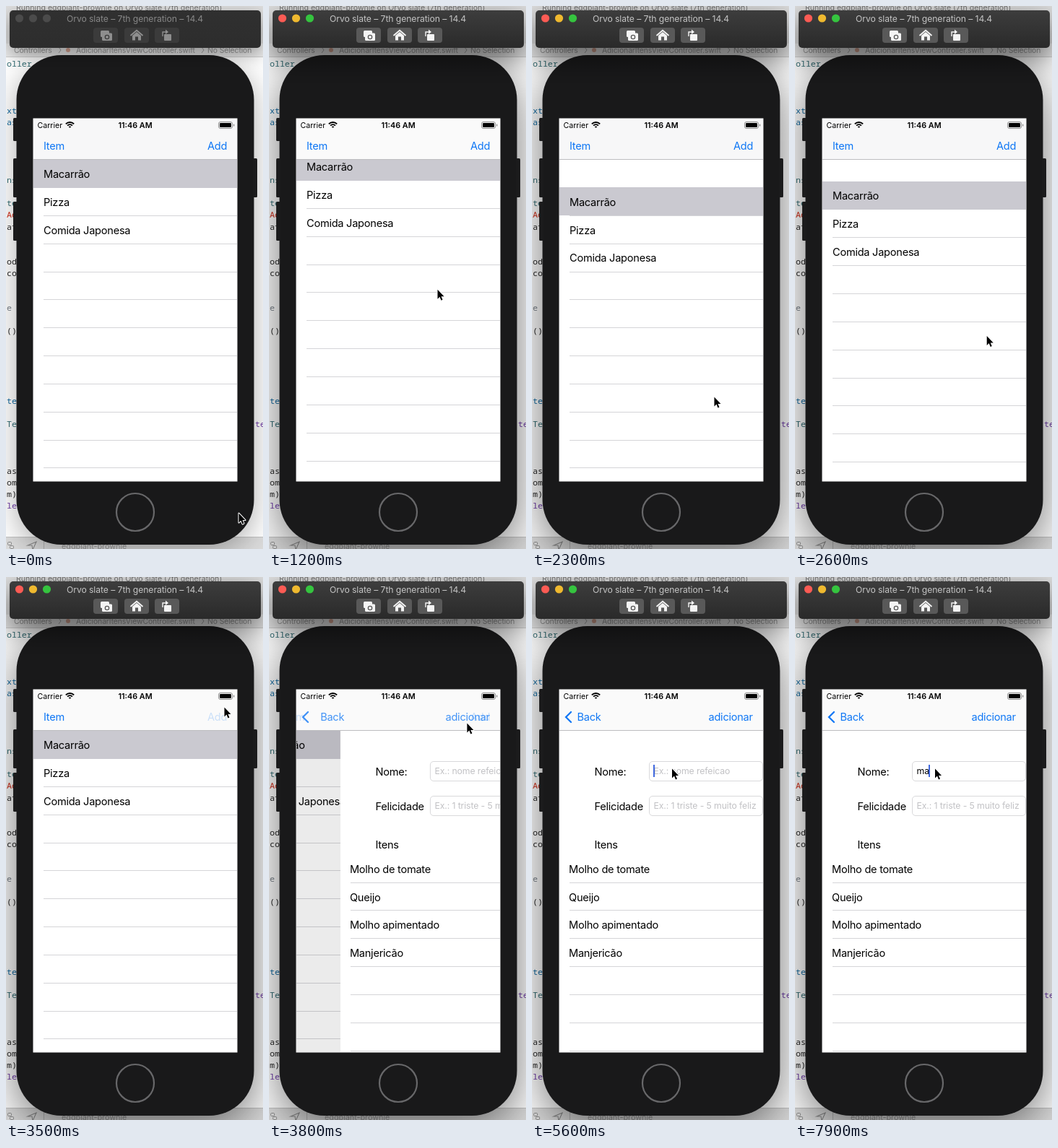
Write an HTML page with a canvas that moves like this. It is 356 px wide and 752 px high and loops after 8000 ms.

```html
<!DOCTYPE html>
<html lang="pt">
<head>
<meta charset="utf-8">
<title>Simulator</title>
<style>
html, body { margin: 0; width: 100%; height: 100%; overflow: hidden; background: #fff; }
canvas { display: block; width: 356px; height: 752px; }
</style>
</head>
<body>
<canvas id="stage" width="356" height="752"></canvas>
<script>
const ctx = document.getElementById('stage').getContext('2d');
const LOOP = 8000, STEP = 100;
const UI = 'Inter, sans-serif', MONO = '"Noto Sans Mono", monospace';
const SCREEN = { x: 38, y: 156, w: 282, h: 502 };
const NAV_BOTTOM = 213, ROW = 38.85;
const BLUE = '#0f77f5', LINE = '#d5d5d8';

// When things happen, in ms
const FOCUS = 900, PRESS = 3300, PUSH = 3600, TAP = 4600, TYPE_M = 6400, TYPE_A = 7900;

const POINTER_START = { x: 322, y: 702 };
const POINTER_MOVES = [
  { from: 0, to: 750, x: 233, y: 412 },
  { from: 1000, to: 1650, x: 233, y: 325 },
  { from: 1800, to: 2300, x: 252, y: 541 },
  { from: 2400, to: 3000, x: 303, y: 215 },
  { from: 3100, to: 3400, x: 302, y: 180 },
  { from: PUSH, to: 4200, x: 193.5, y: 265 }
];

// One text fragment per editor line, with a colour key in front
const CODE = 't:oller||||b:xt|b:as|||||t:ns||t:te|r:Ad|k:at|||k:od|k:co|||g:e||k:()||||||b:te||t:Te||||k:as|k:om|k:m)|p:le';
const SYNTAX = { t: '#326d74', b: '#0f68a0', r: '#d12f1b', k: '#262626', g: '#777f88', p: '#703daa' };

const clamp = v => Math.min(1, Math.max(0, v));
const progress = (t, from, to) => clamp((t - from) / (to - from));
const smooth = (t, from, to) => {
  const u = progress(t, from, to);
  return u * u * (3 - 2 * u);
};

const pointerAt = t => POINTER_MOVES.reduce((p, m) => {
  const u = smooth(t, m.from, m.to);
  return { x: p.x + (m.x - p.x) * u, y: p.y + (m.y - p.y) * u };
}, POINTER_START);

// Drag up, pull down one row past the top, spring back
const scrollAt = t =>
  -44 * smooth(t, 1000, 1650) + (44 + ROW) * smooth(t, 1800, 2250) - ROW * smooth(t, 2450, 2950);

const pushAt = t => 1 - (1 - progress(t, PUSH, PUSH + 500)) ** 3;

function caretAt(t) {
  if (t < TAP) return 0;
  const since = t - (t >= TYPE_A ? TYPE_A : t >= TYPE_M ? TYPE_M : TAP);
  return clamp(0.9 + 2 * Math.cos((since - 200) / 1000 * Math.PI * 2));
}

function rect(x, y, w, h, color) {
  ctx.fillStyle = color;
  ctx.fillRect(x, y, w, h);
}

function round(x, y, w, h, r, color) {
  ctx.beginPath();
  ctx.roundRect(x, y, w, h, r);
  ctx.fillStyle = color;
  ctx.fill();
}

function outline(x, y, w, h, r, color) {
  ctx.beginPath();
  ctx.roundRect(x, y, w, h, r);
  ctx.strokeStyle = color;
  ctx.lineWidth = 1;
  ctx.stroke();
}

function disc(x, y, r, color) {
  ctx.beginPath();
  ctx.arc(x, y, r, 0, Math.PI * 2);
  ctx.fillStyle = color;
  ctx.fill();
}

function stroke(path, color, width) {
  ctx.strokeStyle = color;
  ctx.lineWidth = width;
  ctx.stroke(new Path2D(path));
}

function fill(path, color) {
  ctx.fillStyle = color;
  ctx.fill(new Path2D(path));
}

// y is the middle of the capital letters
function text(str, x, y, { size = 14.6, color = '#000', weight = 400, track = -0.018, align = 'left', font = UI } = {}) {
  ctx.font = `${weight} ${size}px ${font}`;
  ctx.letterSpacing = `${track * size}px`;
  ctx.textAlign = align;
  ctx.fillStyle = color;
  ctx.fillText(str, x, y + size * 0.36);
}

function scoped(draw, { alpha = 1, dx = 0, shadow } = {}) {
  ctx.save();
  ctx.globalAlpha *= alpha;
  ctx.translate(dx, 0);
  if (shadow) {
    ctx.shadowColor = `rgba(0,0,0,${shadow.alpha})`;
    ctx.shadowBlur = shadow.blur;
    ctx.shadowOffsetY = shadow.y;
  }
  draw();
  ctx.restore();
}

function drawEditor() {
  rect(0, 0, 356, 752, '#fff');
  rect(0, 0, 356, 52, '#dedede');
  rect(0, 52, 356, 18, '#ececec');
  rect(0, 70, 356, 1, '#d2d2d2');
  text('Running eggplant-brownie on Orvo slate (7th generation)', 14, 2.5, { size: 10.6, color: '#777', track: 0 });
  const crumb = { size: 10.4, color: '#989898', track: -0.01 };
  text('Controllers', 11, 61, crumb);
  disc(86, 61, 3, '#d9a593');
  text('AdicionarItensViewController.swift', 97, 61, crumb);
  text('No Selection', 279, 61, crumb);
  [73, 271].forEach(x => stroke(`M${x} 57l3 4l-3 4`, '#a5a5a5', 1));

  const lineY = n => 80 + 16.1 * n;
  const code = { size: 11.6, track: 0, font: MONO };
  CODE.split('|').forEach((entry, n) => {
    const [key, str] = entry.split(':');
    if (str) text(str, 1, lineY(n), { ...code, color: SYNTAX[key] });
  });
  text('te', 345, lineY(31), { ...code, color: SYNTAX.p });

  rect(0, 735, 356, 17, '#dcdcdc');
  rect(0, 735, 356, 1, '#c2c2c2');
  outline(2.5, 742.5, 5, 4, 1, '#8a8a8a');
  outline(5.5, 747.5, 5, 4, 1, '#8a8a8a');
  stroke('M30 747l12-5l-5 11l-1-6z', '#8a8a8a', 1.1);
  rect(52, 741, 1, 11, '#b5b5b5');
  text('eggplant-brownie', 77, 748.5, { size: 10.8, color: '#999', track: 0 });
}

function drawDevice(active) {
  const body = () => round(14.5, 68, 329, 678, 62, '#19191a');
  const shadow = active ? { alpha: 0.55, blur: 62, y: 16 } : { alpha: 0.32, blur: 40, y: 10 };
  scoped(body, { shadow });
  round(10, 155, 6, 32, 1.5, '#1b1b1c');
  [10, 342].forEach(x => round(x, 211, 6, 54, 1.5, '#1b1b1c'));
  round(10, 271, 6, 54, 1.5, '#1b1b1c');
  ctx.beginPath();
  ctx.arc(179, 701, 26, 0, Math.PI * 2);
  ctx.strokeStyle = '#68686a';
  ctx.lineWidth = 2.2;
  ctx.stroke();
}

function drawTitleBar(active) {
  const shade = ctx.createLinearGradient(0, 6, 0, 58);
  shade.addColorStop(0, active ? '#3d3d3d' : '#303030');
  shade.addColorStop(1, active ? '#2a2a2a' : '#2d2d2d');
  scoped(() => round(5, 6, 348, 52, 5, shade), {
    shadow: active ? { alpha: 0.6, blur: 40, y: 14 } : { alpha: 0.38, blur: 24, y: 8 }
  });
  ['#fc5b54', '#efb92f', '#35c43f'].forEach((c, i) => disc(18.5 + 19 * i, 17, 5.6, active ? c : '#4b4b4b'));
  text('Orvo slate – 7th generation – 14.4', 178.5, 17.5,
    { size: 12.2, color: active ? '#c4c4c4' : '#878787', track: -0.006, align: 'center' });

  const icon = active ? '#f4f4f4' : '#8e8e8e', button = active ? '#595959' : '#3b3b3b';
  [121, 164, 206].forEach(x => round(x, 30, 34, 21, 4, button));
  round(131, 34, 12, 9, 1.5, icon);
  round(133, 37.5, 14, 10.5, 1.5, icon);
  disc(140, 43, 3.3, button);
  disc(140, 43, 2, icon);
  stroke('M172.5 41l8.5-7.2l8.5 7.2', icon, 1.8);
  fill('M175 41l6-5l6 5v6.5h-4v-5h-4v5h-4z', icon);
  round(219, 39, 10, 9, 1, icon);
  stroke('M217 42v-6h5', icon, 1.4);
  fill('M221 32.5l4 3.5l-4 3z', icon);
}

function drawSeparators(first) {
  for (let y = first; y < 658; y += ROW) rect(52, Math.round(y - 0.5), 268, 1, LINE);
}

function drawMealList(offset) {
  rect(38, NAV_BOTTOM, 282, 445, '#fff');
  const top = 212.6 + offset;
  drawSeparators(top + ROW);
  rect(38, Math.round(top), 282, 39, '#cac9d0');
  ['Macarrão', 'Pizza', 'Comida Japonesa'].forEach((name, i) => text(name, 52, top + 20 + ROW * i));
}

function drawField(y, hint, value) {
  outline(162.5, y - 13.5, 157, 27, 4.5, '#d9d9db');
  text(value || hint, 168.5, y, { size: 12.3, track: -0.01, color: value ? '#000' : '#c2c2c5' });
}

function drawForm(t) {
  rect(38, NAV_BOTTOM, 282, 445, '#fff');
  const typed = t >= TYPE_A ? 'ma' : t >= TYPE_M ? 'm' : '';
  text('Nome:', 86.5, 269.5);
  text('Felicidade', 86.5, 317.5);
  text('Itens', 86.5, 370.5);
  drawField(317, 'Ex.: 1 triste - 5 muito feliz');
  drawField(269, 'Ex.: nome refeicao', typed);
  const caretX = Math.round(168 + ctx.measureText(typed).width);
  scoped(() => rect(caretX, 260, 2, 17, '#4169df'), { alpha: caretAt(t) });
  ['Molho de tomate', 'Queijo', 'Molho apimentado', 'Manjericão'].forEach((name, i) =>
    text(name, 51, 404.5 + ROW * i));
  drawSeparators(423);
}

function drawNavBar(t, push, offset) {
  rect(38, 156, 282, 57, offset < 0 ? '#fafafa' : '#f7f7f8');
  rect(38, 212, 282, 1, '#bdbdc0');
  const link = { color: BLUE };
  const pressed = t >= PRESS && t <= PUSH;
  scoped(() => {
    text('Item', 52 - 40 * push, 194, link);
    scoped(() => text('Add', 279, 194, link), { alpha: pressed ? 0.2 : 1 });
  }, { alpha: 1 - push });
  scoped(() => {
    ctx.lineCap = 'round';
    stroke('M54 187l-7 7l7 7', BLUE, 2.3);
    text('Back', 62.5 + 40 * (1 - push), 194, link);
    text('adicionar', 244.5, 194, link);
  }, { alpha: push });
}

function drawStatusBar() {
  text('Carrier', 43.5, 165.5, { size: 10.6, track: 0 });
  text('11:46 AM', 179, 165.5, { size: 10.8, weight: 600, track: 0, align: 'center' });
  ctx.strokeStyle = '#000';
  ctx.lineWidth = 2;
  [8, 4.8, 1.6].forEach(r => {
    ctx.beginPath();
    ctx.arc(88.5, 169, r, -Math.PI * 0.75, -Math.PI * 0.25);
    ctx.stroke();
  });
  outline(294.5, 160.5, 19, 9, 2.5, '#8d8d8d');
  round(296, 162, 16, 6, 1.2, '#000');
  round(315, 163.5, 1.3, 3, 0.6, '#8d8d8d');
}

function drawScreen(t) {
  const { x, y, w, h } = SCREEN;
  const offset = scrollAt(t), push = pushAt(t);
  rect(x - 0.5, y - 0.5, w + 1, h + 1, '#fff');
  ctx.save();
  ctx.beginPath();
  ctx.rect(x, y, w, h);
  ctx.clip();
  if (push < 1) {
    scoped(() => drawMealList(offset), { dx: -push * w * 0.3 });
    rect(x, NAV_BOTTOM, w, 445, `rgba(0,0,0,${0.1 * push})`);
  }
  if (push > 0) scoped(() => drawForm(t), { dx: (1 - push) * w });
  drawNavBar(t, push, offset);
  drawStatusBar();
  ctx.restore();
}

function drawPointer(t) {
  const { x, y } = pointerAt(t);
  const arrow = 'M1 1v13l3-3l2 5l2-1l-2-4.5h4z';
  ctx.save();
  ctx.translate(x - 0.5, y - 0.5);
  ctx.lineJoin = 'round';
  stroke(arrow, '#fff', 2);
  fill(arrow, '#000');
  ctx.restore();
}

function render(t) {
  const active = t >= FOCUS;
  drawEditor();
  drawDevice(active);
  drawTitleBar(active);
  drawScreen(t);
  drawPointer(t);
}

function tick(now) {
  render(Math.floor(now % LOOP / STEP) * STEP);
  requestAnimationFrame(tick);
}

render(0);
requestAnimationFrame(tick);
</script>
</body>
</html>
```
